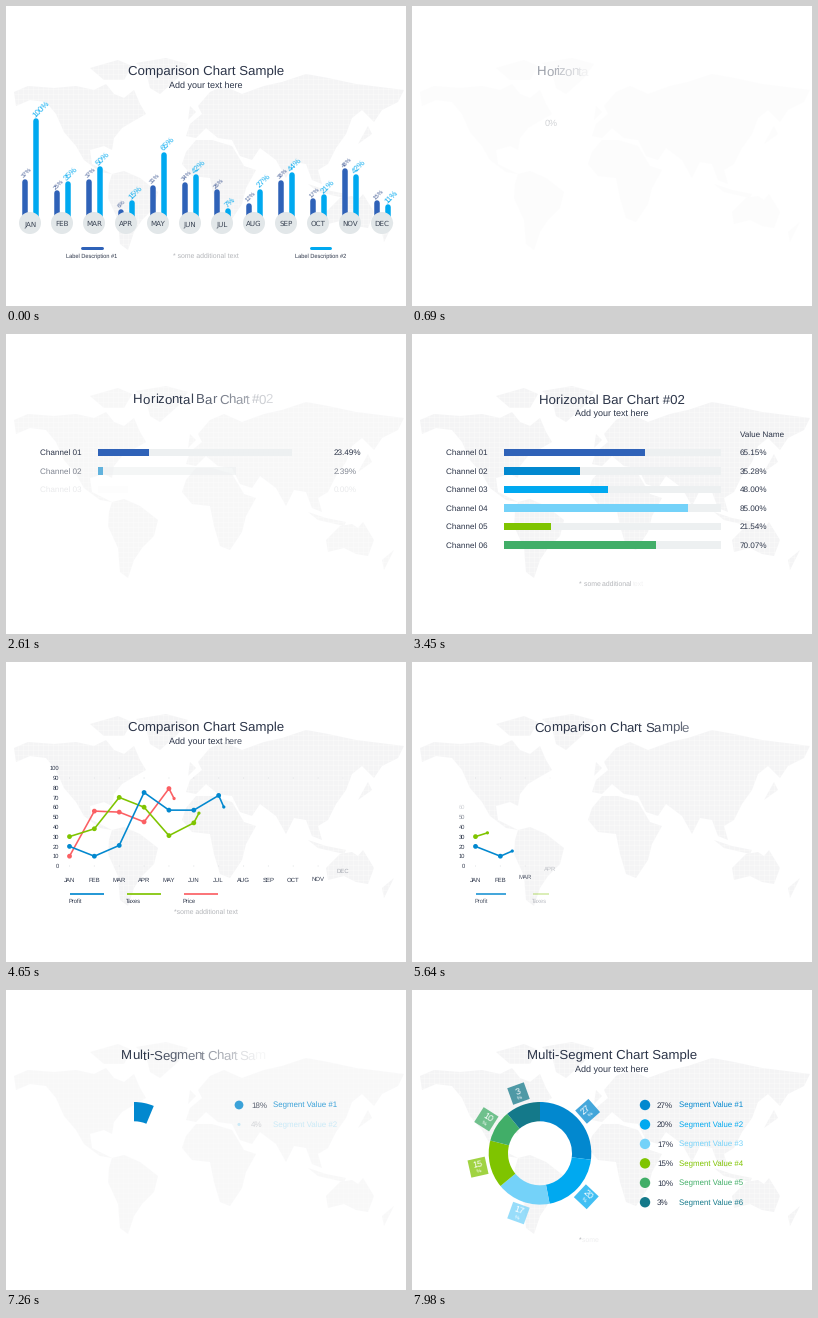
A matplotlib script that plays this animation: 400 by 300 pixels, repeating every 8000 ms.

```python
import numpy as np
import matplotlib.pyplot as plt
from matplotlib.animation import FuncAnimation
from matplotlib.patches import Circle, Polygon, Rectangle, Wedge
from matplotlib.textpath import TextPath

plt.rcParams["font.family"] = "Liberation Sans"
plt.rcParams["text.hinting"] = "none"

LOOP, STEP = 8000, 32
PT = 0.72  # points per pixel at 100 dpi
INK, SOFT, NOTE = "#2b3448", "#454c59", "#b4b6ba"
COLORS = ["#2f62b8", "#0288cf", "#00a9f0", "#74d2f9",
          "#7fc400", "#41ae68", "#14798a", "#7890ad"]
MONTHS = "JAN FEB MAR APR MAY JUN JUL AUG SEP OCT NOV DEC".split()

fig = plt.figure(figsize=(4, 3), dpi=100, facecolor="white")
ax = fig.add_axes([0, 0, 1, 1])
ax.set_xlim(0, 400)
ax.set_ylim(300, 0)
ax.axis("off")

land_parts = []
live = []
widths = {}


# ---- easing -------------------------------------------------------------

def ramp(t, start, length):
    return min(max((t - start) / length, 0.0), 1.0)


def ease(t, start, length):
    return 1 - (1 - ramp(t, start, length)) ** 3


def spring(t, start, length, s=2.6):
    q = ramp(t, start, length) - 1
    return 1 + (s + 1) * q ** 3 + s * q ** 2


# ---- drawing helpers ----------------------------------------------------

def land(points):
    patch = Polygon(points, closed=True, fc="#f4f4f5", ec="none", zorder=0)
    land_parts.append(ax.add_patch(patch))


def text(x, y, s, px, color=INK, a=1.0, ha="left", va="center_baseline", **kw):
    if a > 0:
        live.append(ax.text(x, y, s, fontsize=px * PT, color=color, alpha=a,
                            ha=ha, va=va, **kw))


def label(x, y, s, px, color=INK, a=1.0, ha="left", **kw):
    """Text whose capitals are centred on y."""
    text(x, y + 0.36 * px, s, px, color, a, ha, "baseline", **kw)


def line(xs, ys, color, px, a=1.0, cap="round", z=2):
    if a > 0:
        live.extend(ax.plot(xs, ys, color=color, lw=px * PT, alpha=a, zorder=z,
                            solid_capstyle=cap, solid_joinstyle="round"))


def shape(patch, color, a=1.0, z=2):
    if a > 0:
        patch.set(facecolor=color, edgecolor="none", alpha=a, zorder=z)
        live.append(ax.add_patch(patch))


def dot(x, y, r, color, a=1.0, z=2):
    if r > 0:
        shape(Circle((x, y), r), color, a, z)


def width(s, px):
    key = s, px
    if key not in widths:
        end = [TextPath((0, 0), p + "|", size=px).get_extents().x1 for p in (s, "")]
        widths[key] = end[0] - end[1]
    return widths[key]


def reveal(s, y, px, color, t, pieces, start, step, length, shift):
    """Centred text whose pieces fade and slide in one after another."""
    x = 200 - width(s, px) / 2
    if t >= start + step * (len(pieces) - 1) + length:
        text(x, y, s, px, color, va="baseline")
        return
    done = ""
    for i, piece in enumerate(pieces):
        p = ramp(t, start + step * i, length)
        if piece.strip():
            text(x + width(done, px) - shift * (1 - p) ** 2, y, piece, px,
                 color, p, va="baseline")
        done += piece


def words(s):
    parts = s.split(" ")
    return [w + " " for w in parts[:-1]] + parts[-1:]


def heading(t, title, note_at, note="* some additional text"):
    reveal(title, 69.4, 13.2, INK, t, list(title), 0, 8, 150, 9)
    sub = "Add your text here"
    reveal(sub, 82.3, 9.06, INK, t, words(sub), 380, 80, 80, 3)
    reveal(note, 252, 6.9, NOTE, t, words(note), note_at, 80, 80, 2)


# ---- world map ----------------------------------------------------------

land([(8, 86), (22, 80), (48, 82), (70, 80), (88, 84), (100, 78), (108, 88),
      (118, 92), (128, 84), (134, 98), (140, 108), (126, 116), (116, 122),
      (108, 132), (106, 144), (98, 140), (84, 144), (86, 158), (98, 164),
      (106, 168), (94, 166), (78, 154), (70, 140), (58, 126), (50, 108),
      (40, 96), (24, 94), (10, 100)])
land([(84, 62), (112, 54), (126, 60), (118, 74), (98, 74)])
land([(130, 57), (160, 52), (182, 58), (172, 72), (154, 88), (144, 82), (140, 66)])
land([(106, 168), (118, 165), (134, 172), (152, 186), (148, 202), (136, 214),
      (128, 226), (122, 244), (114, 238), (112, 214), (102, 192), (103, 178)])
land([(180, 130), (184, 118), (196, 108), (192, 100), (204, 86), (218, 80),
      (236, 88), (258, 80), (276, 76), (300, 68), (322, 72), (350, 78),
      (398, 84), (392, 96), (376, 104), (368, 116), (356, 104), (346, 112),
      (340, 128), (330, 142), (322, 158), (312, 164), (316, 178), (306, 174),
      (300, 158), (288, 156), (280, 172), (270, 154), (254, 142), (246, 154),
      (234, 150), (226, 134), (212, 132), (200, 122), (190, 132)])
land([(180, 146), (190, 134), (206, 134), (226, 140), (238, 160), (250, 164),
      (240, 182), (236, 198), (224, 216), (214, 212), (208, 192), (204, 172),
      (186, 170), (176, 158)])
land([(320, 206), (334, 192), (346, 190), (352, 194), (357, 188), (368, 206),
      (362, 222), (350, 220), (338, 214), (322, 218)])
land([(302, 178), (320, 184), (340, 188), (338, 192), (312, 186)])
land([(362, 120), (366, 128), (352, 138)])
land([(184, 100), (190, 106), (182, 114)])
land([(376, 226), (388, 216), (378, 236)])
ax.vlines(np.arange(2, 400, 5), 48, 250, color="white", lw=0.4, alpha=0.5, zorder=0.5)
ax.hlines(np.arange(48, 250, 5), 0, 400, color="white", lw=0.4, alpha=0.5, zorder=0.5)


# ---- scenes -------------------------------------------------------------

def columns(t):
    heading(t, "Comparison Chart Sample", 680)
    dark = [37, 25, 37, 6, 31, 34, 26, 12, 36, 17, 48, 15]
    light = [100, 35, 50, 15, 65, 42, 7, 27, 44, 21, 42, 11]
    for i, month in enumerate(MONTHS):
        x = 24 + 32 * i
        grow = ease(t, 120 + 30 * i, 500)
        seen = ramp(t, 100 + 30 * i, 100)
        for dx, v, color, px, tone in ((-5.2, dark[i], COLORS[0], 6, "#4a6299"),
                                       (6, light[i], COLORS[2], 8, COLORS[2])):
            top = 209 - 0.97 * v * grow
            line([x + dx] * 2, [212, top + 2.7], color, 5.5, seen)
            text(x + dx - 2.4, top - 2, f"{v * grow:.0f}%", px, tone, seen,
                 va="center", rotation=45, rotation_mode="anchor")
        dot(x, 217, 11 * ease(t, 40 + 30 * i, 200), "#e2e7e9", z=3)
        label(x, 217.7, month, 7.2, "#3c4656", seen, "center",
              family="DejaVu Sans", zorder=4)
    for i, x in enumerate((86, 314.5)):
        a = ramp(t, 500 + 120 * i, 150)
        half = 9.8 * ease(t, 480 + 120 * i, 250)
        line([x - half, x + half], [241.5] * 2, COLORS[2 * i], 3, a)
        label(x, 249.4, f"Label Description #{i + 1}", 5.7, INK, a, "center")


def bars(t):
    heading(t, "Horizontal Bar Chart #01", 640)
    rows = [("JANUARY", 95), ("FEBRUARY", 35), ("MARCH", 50), ("APRIL", 13),
            ("MAY", 70), ("JUNE", 40), ("JULY", 6), ("AUGUST", 18)]
    for i, (name, v) in enumerate(rows):
        y, start = 116 + 13.65 * i, 55 + 50 * i
        a = ramp(t, start, 70)
        p = ease(t, start + 40, 500)
        x0 = 120.4 + 3.5 * (1 - ramp(t, start, 120))
        tip = max(120.4 + 1.6 * v * p, x0)
        line([x0, tip], [y, y], COLORS[i], 6.7, a)
        label(tip + 9.6 + 3.2 * p - 0.5, y + 0.8, f"{v * p:.0f}%", 9, SOFT, a)
        label(106.6, y, name, 6.5, SOFT, ramp(t, start + 90, 120), "right")


def tracks(t):
    heading(t, "Horizontal Bar Chart #02", 790)
    label(327.5, 100.3, "Value Name", 8.1, INK, ramp(t, 250, 150))
    for i, v in enumerate((65.15, 35.28, 48, 85, 21.54, 70.07)):
        y, start = 118.5 + 18.45 * i, 80 + 60 * i
        a = ramp(t, start, 120)
        p = ease(t, start + 60, 520)
        shape(Rectangle((92, y - 3.8), 216.5 * ease(t, start, 250), 7.6), "#edf0f1", a)
        shape(Rectangle((92, y - 3.8), 2.165 * v * p, 7.6), COLORS[i], a, 3)
        label(34.5, y, f"Channel {i + 1:02d}", 8.1, INK, a)
        label(327.5, y, f"{v * p:.2f}%", 8.1, INK, a)


def lines(t):
    heading(t, "Comparison Chart Sample", 450, "*some additional text")
    xs = 63.5 + 24.86 * np.arange(12)
    for i in range(11):
        label(53, 204 - 9.8 * i, str(10 * i), 5.8, INK, ramp(t, 80 + 30 * i, 90), "right")
    for i, month in enumerate(MONTHS):
        p = ramp(t, 105 + 50 * i, 90)
        label(xs[i], 217.5 - 14 * (1 - p), month, 6, INK, p, "center")
        for y in (116, 204):
            dot(xs[i], y, 0.5, "#d9dcdf", p)

    series = [("Profit", COLORS[1], [20, 10, 21, 75, 57, 57, 72, 15, 38, 60, 52, 80]),
              ("Taxes", COLORS[4], [30, 38, 70, 60, 31, 44, 92, 70, 55, 66, 40, 48]),
              ("Price", "#fb5f63", [10, 56, 55, 45, 79, 30, 42, 60, 35, 25, 64, 58])]
    for k, (name, color, values) in enumerate(series):
        a = ramp(t, 150 + 80 * k, 150)
        x = 63.5 + 57 * k
        line([x, x + 34 * ease(t, 150 + 80 * k, 250)], [232, 232], color, 1.7, a, "butt")
        label(x - 0.8, 239.2, name, 5.8, INK, a)

        pos = min((t - 150) / 87 - k, 11)
        if pos < 0:
            continue
        ys = 204 - 0.98 * np.array(values)
        n = int(pos)
        tip = xs[0] + 24.86 * pos, np.interp(pos, np.arange(12), ys)
        line([*xs[:n + 1], tip[0]], [*ys[:n + 1], tip[1]], color, 1.6, z=4 - 0.1 * k)
        for px, py in zip(xs[:n + 1], ys):
            dot(px, py, 2.4, color, z=4 - 0.1 * k)
        dot(*tip, 1.6, color, z=4 - 0.1 * k)


def rings(t):
    heading(t, "Multi-Ring Chart Sample", 615)
    rows = [("January", 25), ("February", 49), ("March", 26),
            ("April", 39), ("May", 64), ("June", 51)]
    for i, (name, v) in enumerate(rows):
        start = 112 + 48 * i
        color, y = COLORS[i], 124 + 15.9 * i
        sweep = 2 * np.pi * v / 100 * spring(t, start, 600)
        if t > start:
            ang = np.linspace(0, max(sweep, 0), 70)
            r = 57.8 - 4.66 * i
            line(133.7 + r * np.sin(ang), 163.3 - r * np.cos(ang), color, 3.7,
                 ramp(t, start, 60))
        a = ramp(t, start - 40, 120)
        dot(221, y, 4.3 * ease(t, start - 40, 200), color, a)
        label(235.5, y, f"{v * ease(t, start, 300):.0f}%", 9.4, INK, a)
        label(262.5, y, name, 9.4, color, ramp(t, start, 150))


def donut(t):
    heading(t, "Multi-Segment Chart Sample", 820)
    values = (27, 20, 17, 15, 10, 3)
    cx, cy = 128, 163.3
    sweep = 360 * ramp(t, 120, 520) ** 1.3
    begin = 0
    for i, v in enumerate(values):
        color, y = COLORS[i + 1], 115 + 19.45 * i
        end = 360 if i == 5 else begin + 3.6 * v
        if sweep > begin:
            shape(Wedge((cx, cy), 51.3, begin - 90, min(end, sweep) - 90, width=19.3), color)

        mid = (begin + end) / 2
        p = ease(t, 400 + 70 * i, 180)
        if p > 0:
            turn = (45 - mid) % 90 - 45
            th, m = np.radians(turn), np.radians(mid)
            r = 50 + 13.5 * p
            fx, fy = cx + r * np.sin(m), cy - r * np.cos(m)
            across = np.array([np.cos(th), -np.sin(th)])
            down = np.array([np.sin(th), np.cos(th)])
            half = 8.8 * p
            corners = [(fx, fy) + half * (sx * across + sy * down)
                       for sx, sy in ((-1, -1), (1, -1), (1, 1), (-1, 1))]
            shape(Polygon(corners), color, 0.74 * p, 1.5)
            for s, px, off in ((str(v), 9, -2.3), ("%", 5.5, 4.6)):
                text(fx + off * down[0], fy + off * down[1], s, px, "white", p,
                     "center", "center", rotation=turn, rotation_mode="anchor")
        begin = end

        a = ramp(t, 90 + 70 * i, 120)
        dot(233, y, 5.2 * ease(t, 90 + 70 * i, 200), color, a)
        label(245, y, f"{v * ease(t, 90 + 70 * i, 300):.0f}%", 8, INK, a)
        label(267, y, f"Segment Value #{i + 1}", 7.85, color, a)


# scene, start, end, time to build up, time to fold back
SCENES = [(columns, -1200, 600, 1000, 590), (bars, 600, 2380, 1000, 620),
          (tracks, 2380, 3950, 1110, 500), (lines, 3950, 5720, 1330, 420),
          (rings, 5720, 7050, 960, 340), (donut, 7050, 9000, 1200, 400)]


def draw(i):
    while live:
        live.pop().remove()
    now = i * STEP
    for scene, start, end, build, fold in SCENES:
        if start <= now < end:
            t = min(now - start, build * (end - now) / fold)
            for part in land_parts:
                part.set_alpha(ramp(t, 0, 300))
            scene(t)
    return live


anim = FuncAnimation(fig, draw, frames=LOOP // STEP, interval=STEP,
                     init_func=lambda: [], repeat=True, repeat_delay=0, blit=False)
plt.show()
```
